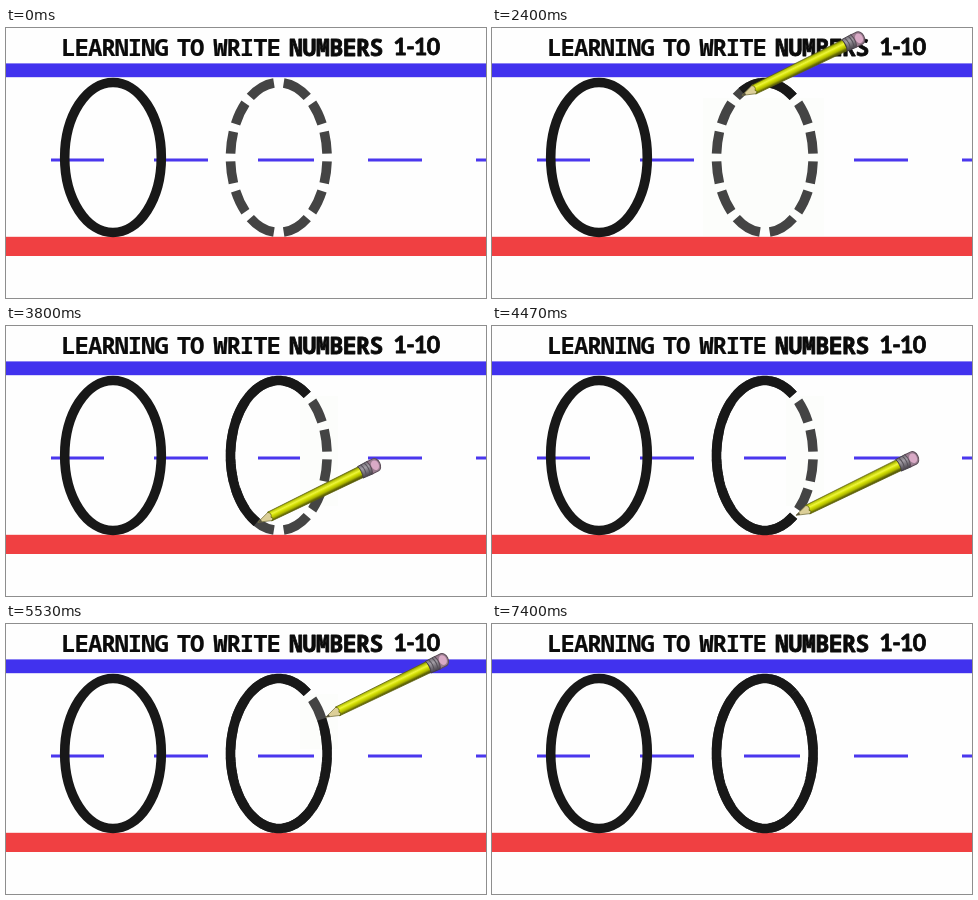
Animation of 480x270 px, one loop 7.59 s. Source, as an HTML page:

```html
<!DOCTYPE html>
<html lang="en">
<head>
<meta charset="utf-8">
<title>Learning to write numbers</title>
<style>
  html, body { margin: 0; width: 100%; height: 100%; overflow: hidden; background: #fefefe; }
  svg { display: block; width: 480px; height: 270px; }
  .title { font: 700 24px "Noto Sans Mono", monospace; letter-spacing: -1.1px; text-anchor: middle;
    fill: #0b0b0b; stroke: #0b0b0b; stroke-width: .2; stroke-linejoin: round; }
  .title .heavy { font-size: 23px; letter-spacing: -.4px; stroke-width: .8; }
  .title .digits { font: 700 23px Lato, sans-serif; letter-spacing: -.7px; stroke-width: .8; }
  .oval { fill: none; stroke: #181818; stroke-width: 9.6; }
  .dashed { stroke: #444; }
  .guide { fill: #4a37ee; }
</style>
</head>
<body>
<svg viewBox="0 0 480 270">
  <defs>
    <linearGradient id="body" x1="0" y1="0" x2="0" y2="1">
      <stop offset="0" stop-color="#7d8408"/>
      <stop offset=".18" stop-color="#c3cf0c"/>
      <stop offset=".36" stop-color="#eef53a"/>
      <stop offset=".52" stop-color="#d2de04"/>
      <stop offset=".7" stop-color="#acb500"/>
      <stop offset=".84" stop-color="#6d7205"/>
      <stop offset="1" stop-color="#45480a"/>
    </linearGradient>
    <linearGradient id="metal" x1="0" y1="0" x2="0" y2="1">
      <stop offset="0" stop-color="#77727a"/>
      <stop offset=".35" stop-color="#a29da5"/>
      <stop offset="1" stop-color="#454048"/>
    </linearGradient>
  </defs>

  <rect width="480" height="270" fill="#fefefe"/>
  <rect y="35.4" width="480" height="13.8" fill="#4132ee"/>
  <rect y="208.8" width="480" height="19.2" fill="#f04042"/>

  <g class="title">
    <text x="108.5" y="27.5">LEARNING</text>
    <text x="184" y="27.5">TO</text>
    <text x="240.5" y="27.5">WRITE</text>
    <text class="heavy" x="330" y="27.5">NUMBERS</text>
    <text class="digits" x="410.5" y="27">1-10</text>
  </g>

  <g class="guide">
    <rect x="45" y="130.5" width="53" height="3"/>
    <rect x="148" y="130.5" width="54" height="3"/>
    <rect x="252" y="130.5" width="56" height="3"/>
    <rect x="362" y="130.5" width="54" height="3"/>
    <rect x="470" y="130.5" width="10" height="3"/>
  </g>
  <rect id="cover" y="70" fill="#fcfdfb"/>

  <ellipse class="oval" cx="107" cy="129.5" rx="48.3" ry="75"/>
  <ellipse class="oval dashed" cx="272.8" cy="129.5" rx="48.3" ry="75" pathLength="392"
    stroke-dasharray="0 4 22 8 23 8 28 10 28 8 23 8 22 4"/>
  <polyline id="ink" class="oval"/>

  <g id="pencil" stroke-linejoin="round">
    <path d="M0 0L14 -4.8L17 0L14 4.8Z" fill="#dccf98" stroke="#77713f" stroke-width=".7"/>
    <path d="M0 0L4 -1.4V1.4Z" fill="#55513d"/>
    <path d="M13 -4.8L115 -5.9V5.9L13 4.8Q17 3 14 1.3Q17 -2 13 -4.8Z" fill="url(#body)" stroke="#60640c" stroke-width=".7"/>
    <path d="M114 -6.4L125 -6.9Q128 0 125 6.9L114 6.4Q117 0 114 -6.4Z" fill="url(#metal)" stroke="#3f3a42" stroke-width=".8"/>
    <path d="M117.5 -6.5Q120.5 0 117.5 6.5M121.5 -6.6Q124.5 0 121.5 6.6" fill="none" stroke="#565059"/>
    <path d="M124.5 -6.7H131A4.6 6.7 0 0 1 131 6.7H124.5Q127 0 124.5 -6.7Z" fill="#9a7d90" stroke="#5b4b57"/>
    <ellipse cx="130.3" cy="0" rx="3.8" ry="5" fill="#d9aac6"/>
  </g>
</svg>

<script>
const LOOP = 7590, STEP = 200 / 3;
const SHOW = 1460, HIDE = 6450;
const START = -36;

// time, angle counterclockwise from the top, tip offset x and y
const keys = [
  [1460, -22, 3, 4],
  [1730, -16, 3, 4],
  [2350, 24, 0, 4],
  [3000, 81, 1, 3],
  [3800, 153, 1, 0],
  [3930, 167, 1, -1],
  [4730, 241, 3, 0],
  [5130, 270, 5, 0],
  [5530, 297, 4, -2],
  [5950, 324, 2, -3]
];

const el = id => document.getElementById(id);
const ink = el('ink'), pencil = el('pencil'), cover = el('cover');

function set(node, attrs) {
  for (const name in attrs) node.setAttribute(name, attrs[name]);
}

function onOval(deg) {
  const a = deg * Math.PI / 180;
  return [272.8 - 48.3 * Math.sin(a), 129.5 - 75 * Math.cos(a)];
}

function pose(t) {
  if (t <= keys[0][0]) return keys[0].slice(1);
  const i = keys.findIndex(k => k[0] > t);
  if (i < 0) return keys[keys.length - 1].slice(1);
  const p = keys[i - 1], q = keys[i], u = (t - p[0]) / (q[0] - p[0]);
  return [1, 2, 3].map(n => p[n] + (q[n] - p[n]) * u);
}

function arc(from, to) {
  const pts = [];
  for (let a = from; a < to; a += 2) pts.push(onOval(a));
  pts.push(onOval(to));
  return pts.map(p => p.map(v => v.toFixed(2)).join()).join(' ');
}

// The blank patch behind the dashes shrinks as they are traced.
function patch(t) {
  if (t < SHOW || t >= 5950) return { width: 0, height: 0 };
  if (t < 3120) return { x: 211, width: 121, height: 138 };
  return { x: 294, width: 38, height: t < 5080 ? 110 : 55 };
}

function draw(now) {
  const t = Math.floor((now % LOOP + 4) / STEP) * STEP;
  const [a, dx, dy] = pose(t);
  const [x, y] = onOval(a);
  set(ink, { points: t < SHOW ? '' : arc(START, a) });
  set(cover, patch(t));
  set(pencil, {
    transform: `translate(${x + dx} ${y + dy}) rotate(-26)`,
    visibility: t >= SHOW && t < HIDE ? 'visible' : 'hidden'
  });
}

const begin = performance.now();
function tick() {
  draw(performance.now() - begin);
  requestAnimationFrame(tick);
}
tick();
</script>
</body>
</html>
```
